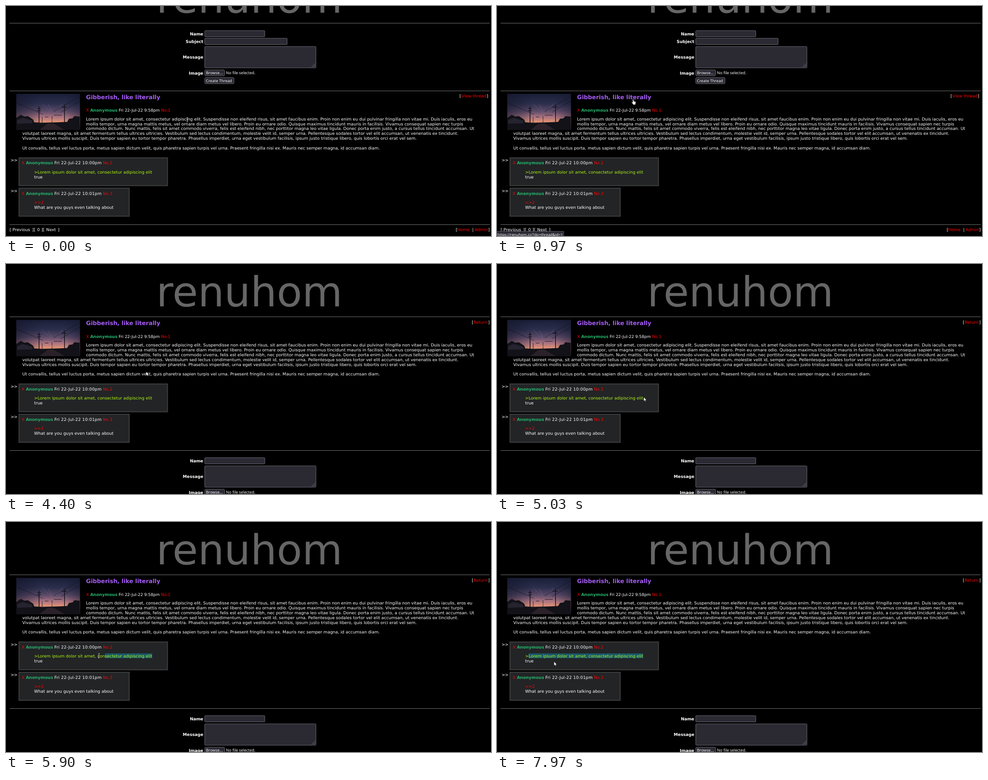
Animation of 1086x516 px, one loop 8000 ms. Source, as an HTML page:

```html
<!DOCTYPE html>
<html lang="en">
<head>
<meta charset="utf-8">
<title>Message board</title>
<style>
  html, body { margin: 0; width: 100%; height: 100%; overflow: hidden; background: #000; }
  svg { display: block; width: 1086px; height: 516px; }
  text { font: 9.3px "DejaVu Sans", sans-serif; fill: #fff; text-rendering: geometricPrecision; }
  .big { font-size: 92.8px; fill: #666; text-anchor: middle; }
  .label { font-weight: bold; text-anchor: end; }
  .ui { font: 8.8px "Noto Sans", sans-serif; fill: #fbfbfe; }
  .subject { font-size: 12.95px; font-weight: bold; fill: #a55cf5; }
  .red { fill: #f00; }
  .user { font-weight: bold; fill: #24b26b; }
  .small { font-size: 9px; }
  .wide { letter-spacing: .25px; }
  .quote { fill: #adf614; }
  .rule { stroke: #777; }
  .field { fill: #2b2a33; stroke: #74747f; stroke-width: .9; }
  .reply { fill: #222426; stroke: #393939; stroke-width: 2.4; }
  .grip { stroke: #8f8f9d; stroke-width: .8; }
</style>
</head>
<body>
<svg viewBox="0 0 1086 516">
  <defs>
    <linearGradient id="sky" x2="0" y2="1">
      <stop offset="0" stop-color="#1a1f38"/>
      <stop offset=".28" stop-color="#2d2f4d"/>
      <stop offset=".48" stop-color="#5c4b69"/>
      <stop offset=".64" stop-color="#a87280"/>
      <stop offset=".77" stop-color="#dc8f76"/>
      <stop offset="1" stop-color="#3a2a30"/>
    </linearGradient>
    <linearGradient id="dusk">
      <stop offset="0" stop-color="#14162a" stop-opacity=".6"/>
      <stop offset=".4" stop-color="#14162a" stop-opacity="0"/>
      <stop offset=".75" stop-color="#14162a" stop-opacity="0"/>
      <stop offset="1" stop-color="#14162a" stop-opacity=".45"/>
    </linearGradient>
  </defs>

  <g id="head">
    <text class="big" x="545" y="95">renuhom</text>
    <path class="rule" d="M8 118.5H1083"/>
  </g>

  <g id="nameRow">
    <text class="label" x="441.7" y="65.6">Name</text>
    <rect class="field" x="445" y="55.2" width="134.5" height="14" rx="1.5"/>
  </g>
  <g id="messageRows">
    <text class="label" x="441.7" y="118.3">Message</text>
    <rect class="field" x="445" y="90.9" width="249" height="47.9" rx="1.5"/>
    <path class="grip" d="M684.5 137.2l8-8M688.5 137.2l4-4"/>
    <text class="label" x="441.7" y="153.5">Image</text>
    <rect class="field" x="445" y="143.2" width="44.5" height="13.5" rx="2.5"/>
    <text class="ui" x="447.8" y="153.3">Browse...</text>
    <text class="ui" x="492.6" y="153.3">No file selected.</text>
    <rect class="field" x="445" y="160.4" width="65.5" height="14" rx="2.5"/>
    <text class="ui" x="447.8" y="170.9">Create Thread</text>
  </g>

  <g id="thread">
    <g transform="translate(23 197)">
      <rect width="142.5" height="81" fill="url(#sky)"/>
      <path d="M58 22l20 20M72 24l8 16M104 22l-14 18" stroke="#8d8da8" stroke-opacity=".35"/>
      <rect width="142.5" height="81" fill="url(#dusk)"/>
      <path d="M142 6L84 40M142 16L100 42M0 20L60 46" stroke="#12121c" stroke-width=".7" fill="none"/>
      <path d="M0 54l10-7 8 4 8-1 12 8 2 6 18 1 34-1 22-1 4-7 8-1 4-5 12 1v30H0z" fill="#121218"/>
      <path d="M2 59l12-5 22 6v6l-34 1z" fill="#25232f"/>
      <path d="M51 28V73M47 33h8M47 38h8M108 24V78M102 30h11" stroke="#14131b" stroke-width="1.6"/>
      <path d="M58 52V70M80 50V68M64 52h8M84 48h18" stroke="#201b26"/>
      <path d="M52 81l18-14h14l24 14z" fill="#2a2228"/>
      <path d="M63 61h2M78 59h2M98 62h2" stroke="#ff9a6a" stroke-width="1.4"/>
    </g>
    <text class="subject" x="179.3" y="208.9">Gibberish, like literally</text>
    <text class="red" x="179.4" y="237">X</text>
    <text class="user" x="188.4" y="237">Anonymous</text>
    <text class="small" x="252.3" y="237">Fri 22-Jul-22 9:58pm</text>
    <text class="red" x="346.9" y="237">No.1</text>
    <g id="body"></g>

    <text x="10.2" y="349.3">&gt;&gt;</text>
    <rect class="reply" x="29.2" y="340.7" width="332.3" height="62.3"/>
    <text class="red" x="35" y="355">X</text>
    <text class="user" x="44.4" y="355">Anonymous</text>
    <text class="wide" x="108.2" y="355">Fri 22-Jul-22 10:00pm</text>
    <text class="red" x="216.9" y="355">No.2</text>
    <rect id="mark" y="366.3" height="10.8" fill="#19586b"/>
    <text class="quote" id="quote" x="63" y="375.8">&gt;Lorem ipsum dolor sit amet, consectetur adipiscing elit</text>
    <text x="63" y="386.6">true</text>

    <text x="10.2" y="417.6">&gt;&gt;</text>
    <rect class="reply" x="29.2" y="408.7" width="246.6" height="62.8"/>
    <text class="red" x="35" y="423.5">X</text>
    <text class="user" x="44.4" y="423.5">Anonymous</text>
    <text class="wide" x="108.2" y="423.5">Fri 22-Jul-22 10:01pm</text>
    <text class="red" x="216.9" y="423.5">No.3</text>
    <text class="red" x="63" y="443.7">&gt;&gt;2</text>
    <text x="63" y="454.5">What are you guys even talking about</text>
  </g>
  <path class="rule" id="endRule" d="M8 490.5H1083"/>

  <g id="indexOnly">
    <text class="label" x="441.7" y="83">Subject</text>
    <rect class="field" x="445" y="72.4" width="184.5" height="14" rx="1.5"/>
    <path class="rule" d="M8 190.5H1083"/>
    <text y="205"><tspan x="1015.5">[</tspan><tspan class="red" x="1020">View thread</tspan><tspan x="1076.2">]</tspan></text>
    <text y="504.9"><tspan x="8">[</tspan><tspan x="14.6">Previous</tspan><tspan x="58.6">]</tspan><tspan x="62.4">[</tspan><tspan x="69.8">0</tspan><tspan x="79">]</tspan><tspan x="82.8">[</tspan><tspan x="90.1">Next</tspan><tspan x="116">]</tspan></text>
    <text y="504.9"><tspan x="1006.9">[</tspan><tspan class="red" x="1010.6">Home</tspan><tspan x="1043.8">|</tspan><tspan class="red" x="1049.2">Admin</tspan><tspan x="1079.4">]</tspan></text>
    <g id="status">
      <rect x="-1" y="505.5" width="150.5" height="14" fill="#2b2a33" stroke="#55555c"/>
      <text class="ui" x="1" y="515.8" style="font-size:8.4px">https://renuhom.zz/?do=thread&amp;id=1</text>
    </g>
  </g>
  <text id="threadOnly" y="133.9"><tspan x="1043.1">[</tspan><tspan class="red" x="1047">Return</tspan><tspan x="1079.4">]</tspan></text>

  <g id="cursor">
    <path id="beam" d="M-1.5 -5h3M0 -5V5M-1.5 5h3" stroke="#ddd" stroke-width=".9"/>
    <path id="arrow" d="M0 0V9.2L2.1 7.3L3.5 10.4L5 9.7L3.6 6.8H6.4Z" fill="#fff" stroke="#000" stroke-width=".6"/>
    <path id="hand" d="M-1.2 .4Q0 -1 1 .4V4L5 5Q6 5.4 5.8 7L5 10V12H-.6V10.4L-3.6 7Q-3.4 5.6 -2 6.2L-1.2 7Z" fill="#fff" stroke="#000" stroke-width=".6"/>
  </g>
</svg>
<script>
const LOOP = 8000, OPEN = 3400, LAG = 40;
const $ = id => document.getElementById(id);

const lines = [
  [179.2, "Lorem ipsum dolor sit amet, consectetur adipiscing elit. Suspendisse non eleifend risus, sit amet faucibus enim. Proin non enim eu dui pulvinar fringilla non vitae mi. Duis iaculis, eros eu"],
  [179.2, "mollis tempor, urna magna mattis metus, vel ornare diam metus vel libero. Proin eu ornare odio. Quisque maximus tincidunt mauris in facilisis. Vivamus consequat sapien nec turpis"],
  [179.2, "commodo dictum. Nunc mattis, felis sit amet commodo viverra, felis est eleifend nibh, nec porttitor magna leo vitae ligula. Donec porta enim justo, a cursus tellus tincidunt accumsan. Ut"],
  [36.6, "volutpat laoreet magna, sit amet fermentum tellus ultrices ultricies. Vestibulum sed lectus condimentum, molestie velit id, semper urna. Pellentesque sodales tortor vel elit accumsan, ut venenatis ex tincidunt."],
  [36.6, "Vivamus ultrices mollis suscipit. Duis tempor sapien eu tortor tempor pharetra. Phasellus imperdiet, urna eget vestibulum facilisis, ipsum justo tristique libero, quis lobortis orci erat vel sem."],
  [36.6, ""],
  [36.6, "Ut convallis, tellus vel luctus porta, metus sapien dictum velit, quis pharetra sapien turpis vel urna. Praesent fringilla nisi ex. Mauris nec semper magna, id accumsan diam."]
];
lines.forEach(([x, words], i) => {
  const el = document.createElementNS("http://www.w3.org/2000/svg", "text");
  el.setAttribute("x", x);
  el.setAttribute("y", 256.7 + i * 10.83);
  el.textContent = words;
  $("body").append(el);
});

// Pointer path: time, x, y, and 1 where the move into the key is eased
const path = [
  [0, 406, 255], [20, 406, 255], [830, 305, 209.5, 1], [4180, 305.5, 210],
  [4730, 328.5, 298.5, 1], [5030, 328.5, 298.5], [5400, 318, 300], [5600, 296, 300],
  [5730, 259, 300], [5900, 208.5, 300], [6150, 128, 299], [6370, 75, 295],
  [6500, 73.3, 293.2], [6600, 73.3, 293.2], [6630, 73.8, 293.6], [6880, 73.8, 293.6],
  [7030, 82, 292.6, 1], [7200, 82, 292.6], [7230, 82.5, 292.8], [7870, 82.5, 292.8],
  [7900, 94, 299], [7970, 127.5, 313], [8000, 134, 316]
];

function pointer(t) {
  const i = path.findIndex(k => k[0] > t);
  const [t0, x0, y0] = path[i - 1], [t1, x1, y1, eased] = path[i];
  let p = (t - t0) / (t1 - t0);
  if (eased) p = p * p * (3 - 2 * p);
  return [x0 + (x1 - x0) * p, y0 + (y1 - y0) * p];
}

function shape(t, y) {
  if (t < OPEN) {
    if (y < 211.5) return "hand";
    return y > 247 || (y > 228.5 && y < 239) ? "beam" : "arrow";
  }
  if (t < 4800) return y < 231 || (y > 242 && y < 253) ? "beam" : "arrow";
  return t > 5070 && t < 6400 ? "beam" : "arrow";
}

const shift = (id, y) => $(id).setAttribute("transform", `translate(0 ${y})`);
const show = (id, on) => { $(id).style.display = on ? "" : "none"; };

function select(t) {
  const quote = $("quote"), count = quote.getNumberOfChars();
  const end = quote.getEndPositionOfChar(count - 1).x;
  let left = end;
  if (t > 5070) {
    const x = t > 6400 ? 0 : pointer(t - LAG)[0];
    for (let i = count - 1; i > 0; i--) {
      const edge = quote.getStartPositionOfChar(i).x;
      if (Math.abs(edge - x) < Math.abs(left - x)) left = edge;
    }
  }
  $("mark").setAttribute("x", left);
  $("mark").setAttribute("width", end - left);
}

function draw(t) {
  const index = t < OPEN;
  shift("head", index ? -80 : 0);
  shift("nameRow", index ? 0 : 379.3);
  shift("messageRows", index ? 0 : 362);
  shift("thread", index ? 0 : -71.5);
  shift("endRule", index ? 0 : -72);
  show("indexOnly", index);
  show("threadOnly", !index);
  $("status").style.opacity = Math.min(1, Math.max(0, (t - 810) / 150));
  select(t);

  const [x, y] = pointer(t), kind = shape(t, y);
  for (const id of ["beam", "arrow", "hand"]) show(id, id === kind);
  $("cursor").setAttribute("transform", `translate(${x} ${y})`);
}

function tick() {
  draw(performance.now() % LOOP);
  requestAnimationFrame(tick);
}
tick();
</script>
</body>
</html>
```
